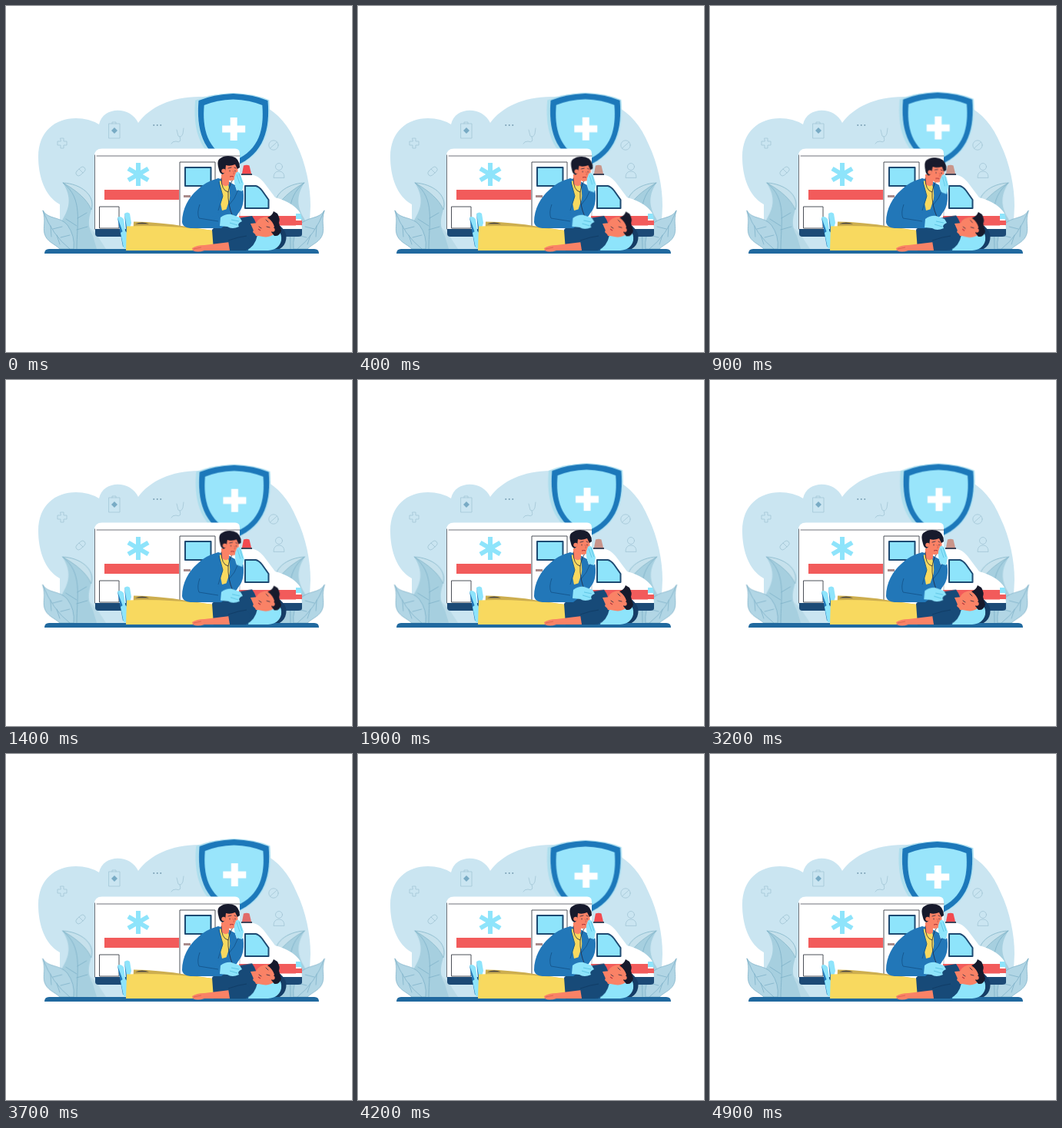
An HTML page without scripts for the animation above (5000 ms loop, 450 by 450 pixels).

```html
<!DOCTYPE html>
<html lang="en">
<head>
<meta charset="utf-8">
<title>First aid</title>
<style>
html, body { margin: 0; width: 100%; height: 100%; overflow: hidden; background: #fff; }
svg { display: block; width: 100%; height: 100%; }
.line { fill: none; stroke: #a3c6d6; stroke-width: .8; stroke-linecap: round; stroke-linejoin: round; }
.vein { fill: none; stroke: #78adc4; stroke-width: .7; stroke-linecap: round; }
.ink { stroke: #4c5058; stroke-width: 1; stroke-linejoin: round; }
.pane { fill: #8ee4fb; stroke: #1d4a72; stroke-width: 2; stroke-linejoin: round; }
.thin { fill: none; stroke: #20283f; stroke-width: .8; stroke-linecap: round; }
.skin { fill: #fa8266; }
.hair { fill: #171a2c; }
.glove { fill: #8ee4fb; }
.coat { fill: #2277b8; }
.navy { fill: #174a78; }
.red { fill: #f25b5b; }

.shield { animation: float 2.5s ease-in-out infinite alternate; }
.lamp { animation: blink .714286s linear infinite; }
.leaf { animation: sway 2.5s ease-in-out infinite alternate; }
.leaf.l { transform-origin: 92px 316px; --a: -.6deg; }
.leaf.r { transform-origin: 373px 316px; --a: .6deg; }
.head { transform-origin: 287px 226px; animation: nod 5s ease-in-out infinite; }
.palm { animation: touch 5s ease-in-out infinite; }
.face { transform-origin: 322px 294px; animation: roll 5s ease-in-out infinite; }
.chest { transform-origin: 300px 318px; animation: breathe 1.25s ease-in-out infinite alternate; }

@keyframes float { to { transform: translate(2px, -5.5px); } }
@keyframes blink { 0%, 12%, 86%, 100% { fill: #f34a50; } 26%, 66% { fill: #c9958a; } }
@keyframes sway { to { transform: rotate(var(--a)); } }
@keyframes nod { 0%, 38%, 100% { transform: none; } 18% { transform: translate(2px, 2px) rotate(5deg); } }
@keyframes touch { 0%, 74%, 100% { transform: none; } 18% { transform: translate(1px, 2px); } 46% { transform: translate(1px, -3px); } }
@keyframes roll { 0%, 38%, 100% { transform: none; } 18% { transform: rotate(2deg); } }
@keyframes breathe { to { transform: scaleY(1.015); } }
</style>
</head>
<body>
<svg viewBox="0 0 450 450">
  <defs>
    <path id="guard" d="M0-47Q26-46 45-38C48-2 41 31 3 47Q0 48-3 47C-41 31-48-2-45-38Q-26-46 0-47Z"/>
    <path id="plus" d="M-4.500-15h9v10.500H15v9H4.500V15h-9V4.500H-15v-9h10.500z"/>
    <rect id="bar" x="-3" y="-15" width="6" height="30"/>
    <g id="tall">
      <path fill="#b9dae7" d="M102 283Q114 292 121 302L130 316H92Z"/>
      <path fill="#a6cfdf" d="M74 230C97 231 117 246 111 265C107 278 106 287 113 299L118 316H75C66 302 67 288 75 275C82 263 86 249 74 230Z"/>
      <path fill="#c6e1ec" stroke="#86b6ca" stroke-width=".8" d="M74 230C97 231 117 246 111 265C106 252 92 240 74 230Z"/>
      <path class="vein" d="M74 230C101 250 92 282 92 316M93 276l12-7M92 291l14-4M92 286l-14-9"/>
    </g>
    <g id="wide">
      <path fill="#b2d6e5" stroke="#78adc4" stroke-width=".7" d="M48 266C55 278 70 273 80 285Q90 299 88 316H70C63 309 53 307 50 296C48 287 52 280 48 266Z"/>
      <path class="vein" d="M48 266Q60 298 83 316M58 286l1 14M66 298l4 12M61 290l12-3M71 301l12-3"/>
    </g>
  </defs>

  <!-- Backdrop -->
  <path fill="#cae5f1" d="M70 316V258C50 247 42 221 42 196C42 163 64 146 91 146Q108 146 121 154C126 130 162 130 172 152C187 131 217 117 255 118C306 114 355 122 378 180C390 205 396 235 396 260Q396 288 385 316Z"/>
  <g class="line">
    <path d="M71 172h4v4h4v5h-4v4h-4v-4h-4v-5h4z"/>
    <path d="M134 153h14v19h-14zM138 153v-2h5v2"/>
    <path d="M141 158l4 4-4 4-4-4z" fill="#79abc5" stroke="none"/>
    <path d="M192 155h.5M196.500 155h.5M201 155h.5" style="stroke:#628ca2;stroke-width:1.500"/>
    <path d="M222 161l2 8q4 3 6-3l1-7M226 170q3 9-5 6-5 0-6 3"/>
    <rect x="-7" y="-3.500" width="14" height="7" rx="3.500" transform="translate(97 215) rotate(-42)"/>
    <path d="M95 212l5 5"/>
    <circle cx="348" cy="181" r="6.200"/><path d="M343.500 185l9-8"/>
    <circle cx="355" cy="209" r="4.500"/><path d="M348 223q0-8 7-8t7 8z"/>
  </g>

  <g class="leaf l"><use href="#tall"/><use href="#wide"/></g>
  <g class="leaf r">
    <use href="#tall" transform="matrix(-1 0 0 1 462 0)"/>
    <use href="#wide" transform="matrix(-1 0 0 1 462 0)"/>
  </g>

  <g class="shield">
    <use href="#guard" fill="#addeed" transform="translate(292 161.500) scale(1.020)"/>
    <use href="#guard" fill="#b3e3f3" transform="translate(296 161) scale(1.030 1.020)"/>
    <use href="#guard" fill="#1c78ba" transform="translate(295.500 161)"/>
    <use href="#guard" fill="#99e5fb" transform="translate(295.500 161) scale(.84)"/>
    <use href="#plus" fill="#fff" transform="translate(296.200 160)"/>
  </g>

  <!-- Ambulance -->
  <path fill="#1c4a76" d="M116 289H385V297Q385 300 380 300H120Q116 300 116 296Z"/>
  <path fill="#fff" d="M115 290V195Q115 185.500 125 185.500H298Q304 185.500 304 192V290Z"/>
  <path class="thin" d="M115.500 290V194M118 195H304" style="stroke:#4c5058"/>
  <path class="ink" fill="#fff" d="M226 300V203H272V300"/>
  <rect class="pane" x="233" y="210" width="33.500" height="24"/>
  <rect x="231" y="246" width="9" height="3" fill="#a88b8b"/>
  <path class="red" d="M128 239h97v13h-97z"/>
  <rect class="ink" x="121.500" y="261" width="25.500" height="28" fill="#fff"/>
  <g class="glove" transform="translate(172 219)">
    <use href="#bar"/><use href="#bar" transform="rotate(60)"/><use href="#bar" transform="rotate(-60)"/>
  </g>
  <path class="lamp" d="M309 207.500Q313 206 316.500 207.500L319 218H307Z"/>
  <path fill="#40465a" d="M306 218h14v2h-14z"/>
  <path fill="#fff" d="M302 220H322Q328 221 335 229L350 249Q375 256 383 270L385 290H302Z"/>
  <path class="thin" d="M304 221V289" style="stroke:#8c96a1;stroke-width:.6"/>
  <path class="pane" d="M311 234H325Q329 235 333 240L341.500 252V263H311Z"/>
  <path class="red" d="M303 273h74v12.500h-74z"/>
  <path class="glove" d="M377 270h6l2 7h-8z"/><path class="red" d="M377 279h8v6h-8z"/>
  <circle cx="347" cy="301" r="17.500" fill="#153d66"/>

  <path fill="#20699f" d="M50 322Q50 316 56 316H401Q407 316 407 322Z"/>

  <!-- Patient -->
  <path class="glove" d="M319 302Q323 294 337 296L354 291Q359 297 358 305Q355 317 341 318H315Z"/>
  <path class="glove" d="M145 275Q149 272 153 277L156 298L154 300Q147 290 145 275ZM154 270Q158 267 161 270L163 282L158 300Z"/>
  <path fill="#2277b8" d="M145 275L154 300L157 313H152ZM154 270L159 300L157 302Z"/>
  <path class="glove" d="M149 295Q155 290 158 296V315H153Z"/>
  <path fill="#cdae4f" d="M166 280.500Q200 281 235 287L268 292V303H165Z"/>
  <path fill="#504b44" d="M168 283.500q9-4 18 0z"/>
  <path fill="#f8d95f" d="M157 286.500Q205 284.500 271 292V318H156Z"/>
  <path class="chest navy" d="M268 291Q281 276 302 276L320 273Q328 283 327 298Q324 313 312 318H270Z"/>
  <path class="skin" d="M318 283L328 282L333 299L325 299Z"/>
  <g class="face">
    <path class="skin" d="M325 283Q328 274 342 274L351 281V295Q343 302 334 300Q325 299 321 294Z"/>
    <path class="hair" d="M340 275Q346 273 348 267L353 270Q357 277 355 282L358 292Q356 300 349 299L345 294L349 287Q347 280 340 275Z"/>
    <circle class="skin" cx="347" cy="291" r="2.700"/>
    <path class="thin" d="M338 278l3 3M339 287l4 1M329 287l3 2"/>
    <path d="M328 290l3 2" stroke="#b9363d" stroke-width="1.100"/>
  </g>
  <path class="skin" d="M291 307L292 318H258Q249 321 243 318L242 315Q248 311 258 311Z"/>
  <path class="navy" d="M289 305L315 300Q321 315 307 318H291Z"/>
  <path d="M289 305Q303 300 313 299" fill="none" stroke="#113a62" stroke-width=".8"/>
  <path d="M244 316l10-2" stroke="#cf5b4c" stroke-width=".7"/>

  <!-- Doctor -->
  <path class="coat" d="M276 224Q258 229 249 239C238 248 229 264 229 281Q230 289 243 289H280L300 273Q306 265 303 250L298 233L289 228Z"/>
  <path fill="#f8d95f" d="M278 227L289 232Q294 246 288 264L281 266Q276 246 278 227Z"/>
  <path class="skin" d="M280 219h10v13q-5 5-10-1z"/>
  <path class="coat" d="M276 224L282 248L276 267L270 280L284 272L290 254L302 238L308.500 240Q311 263 300 271Q293 276 285 273L280 287H249L252 276L277 272Z"/>
  <path d="M252 258Q248 269 251 276L276 280M277 229L282 247L276 266M302 239Q298 251 290 259" fill="none" stroke="#15558c" stroke-width=".9"/>
  <path class="thin" d="M280 224Q280 240 289 242Q291 230 298 221M289 242Q288 258 295 274"/>
  <g class="head">
    <path class="skin" d="M282 205L298 203Q303 211 301 219Q300 228 291 227Q284 225 281 214Z"/>
    <path class="hair" d="M277 213Q273 201 279 198Q284 194 294 195.500Q304 198 304 210L301 212L298 206Q291 209 286 207L285 216L282 219Q278 218 277 213Z"/>
    <circle class="skin" cx="283" cy="214.500" r="2.700"/>
    <path class="thin" d="M289 211l4-1M297 210l2 1M291 214v1M298 214v1"/>
    <path d="M295 214l2 4-2 .5" fill="none" stroke="#d75e4d" stroke-width=".8"/>
    <path d="M291 222q3-1 5 0" fill="none" stroke="#a62c35"/>
    <path class="glove" d="M299 217Q302 213 305 219L309 231L307 241L300 239Q296 231 297 223Z"/>
    <path d="M300 219l4 12M303 218l4 12" fill="none" stroke="#51bddd" stroke-width=".7"/>
  </g>
  <g class="palm">
    <path class="glove" d="M279 275Q286 270 293 271L304 275L307 280Q300 283 303 287Q294 291 288 287L278 286Z"/>
    <path d="M293 278l10 2M291 282l10 3" stroke="#51bddd" stroke-width=".8"/>
  </g>
</svg>
</body>
</html>
```
